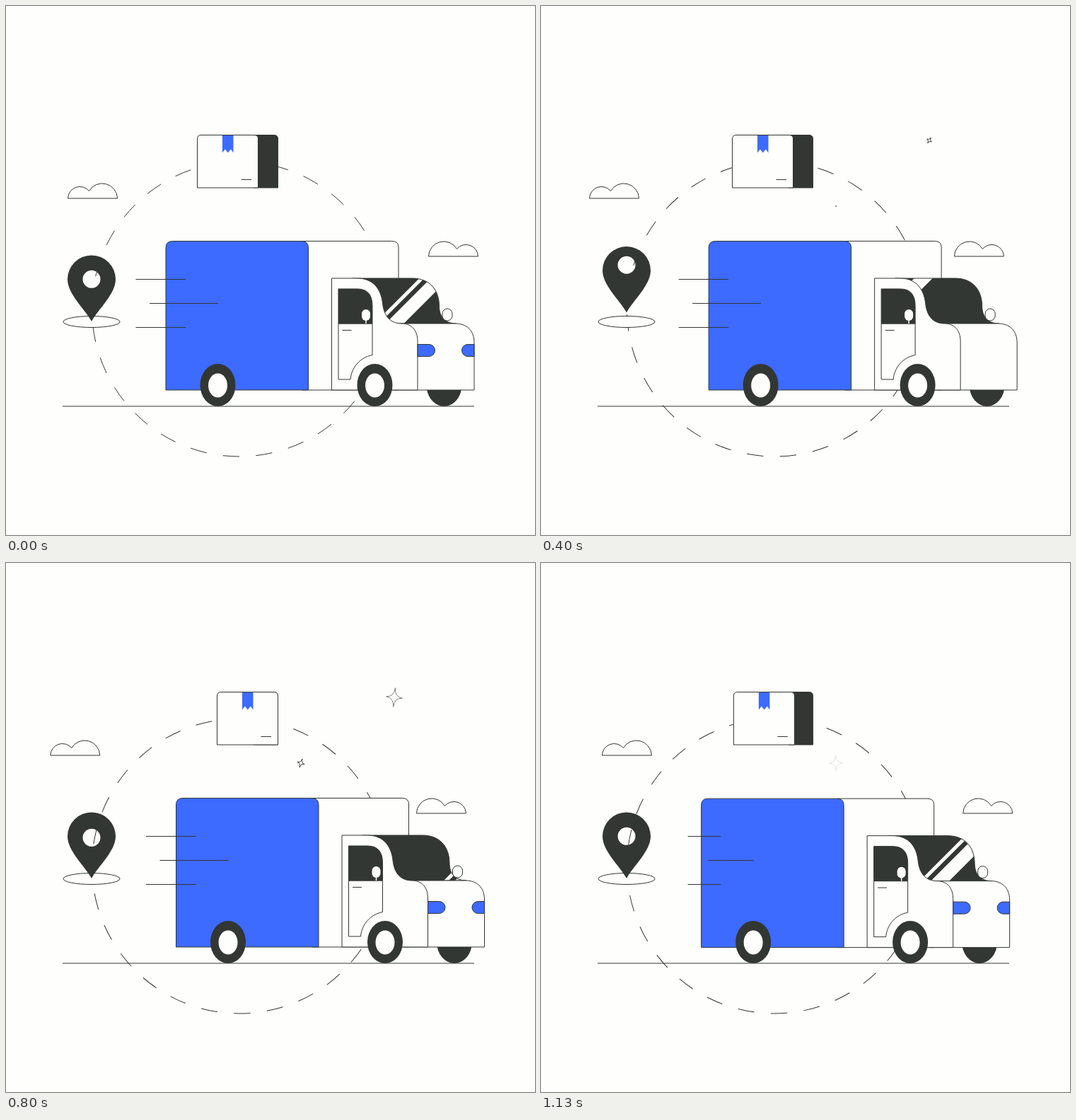
An HTML page for the animation above (1190 ms loop, 748x748 px).

```html
<!DOCTYPE html>
<html lang="en">
<head>
<meta charset="utf-8">
<title>Delivery truck</title>
<style>
  html, body { margin: 0; width: 100%; height: 100%; overflow: hidden; background: #fefefc; }
  svg { display: block; width: 100vw; height: 100vh; }
  .line { fill: #fefefc; stroke: #323734; stroke-width: 1; }
  .dark { fill: #323734; }
  .blue { fill: #3d6aff; }
  .white { fill: #fefefc; }
  .edge { stroke: #323734; stroke-width: 1; }
</style>
</head>
<body>
<svg viewBox="0 0 748 748">
  <defs>
    <path id="cloud" class="line" d="M87.5 272A17 17 0 0 1 117.5 261.5A21.5 21.5 0 0 1 157.5 272Z"/>
    <path id="star" class="line" vector-effect="non-scaling-stroke"
      d="M0-1Q.03-.04 .85 0Q.03 .04 0 1Q-.03 .04-.85 0Q-.03-.04 0-1Z"/>
    <g id="wheel">
      <ellipse class="dark" cy="536" rx="25" ry="30"/>
      <ellipse class="white" cy="536.5" rx="13.5" ry="17"/>
    </g>
    <path id="glass" d="M490 385H575C600 385 613 402 613 424C613 440 622 449 637 449H540Z"/>
    <clipPath id="glassClip"><use href="#glass"/></clipPath>
  </defs>

  <circle id="orbit" cx="330" cy="428.5" r="208.5" fill="none" class="edge" pathLength="56" stroke-dasharray="1 1"/>
  <path class="edge" d="M80 566H662"/>
  <g id="cloudL"><use href="#cloud"/></g>
  <g id="cloudR"><use href="#cloud" transform="translate(755 82) scale(-1 1)"/></g>

  <ellipse class="line" cx="121" cy="446.5" rx="40" ry="8"/>
  <path id="pin" class="dark" fill-rule="evenodd"/>

  <path class="dark edge" d="M350 182.5H379Q384.5 182.5 384.5 188V257H350Z"/>
  <g id="face">
    <path class="line" d="M270.5 257V188Q270.5 182.5 276 182.5H351Q356.5 182.5 356.5 188V257Z"/>
    <path class="blue" d="M306 183H321.5V207.5L317.8 202.5L313.8 207.5L309.8 202.5L306 207.5Z"/>
    <path class="edge" d="M332.5 245.5H347"/>
  </g>

  <g id="starA"><use href="#star"/></g>
  <g id="starB"><use href="#star"/></g>

  <g id="truck">
    <ellipse class="dark" cx="620" cy="536" rx="25" ry="30"/>
    <g id="body">
      <path class="line" d="M419 543V332.5H546Q555.5 332.5 555.5 341V543Z"/>
      <path class="blue edge" d="M226.5 543V342Q226.5 332.5 236 332.5H418.5Q428 332.5 428 342V543Z"/>
      <use href="#glass" class="dark"/>
      <g clip-path="url(#glassClip)">
        <path id="shine" class="white" d="M470 500L610 360H617L477 500ZM486 500L626 360H652L512 500Z"/>
      </g>
      <use href="#glass" fill="none" class="edge"/>
      <path class="line" d="M550 449H636C652 449 662.5 459 662.5 476V543H550Z"/>
      <path class="line" d="M461 543V385H497C521 385 531 402 533 420C535 440 545 449 560 449C575 449 582.5 460 582.5 474V543Z"/>
      <path class="line" d="M470.5 449V528H487.5C489 511 501 497 518.5 493.5V449Z"/>
      <path class="dark edge" d="M470.5 449V400H497Q518.5 400 518.5 424V449Z"/>
      <path class="edge" d="M476 458.5H489"/>
      <path d="M509.5 443V449" stroke="#fefefc" stroke-width="1.5"/>
      <rect class="white" x="503.5" y="429" width="12" height="16" rx="6"/>
      <rect class="line" x="617.5" y="428" width="14" height="17" rx="7"/>
      <g id="lamps" class="blue edge">
        <path d="M582.5 478.5H598.5A8.5 8.5 0 0 1 598.5 495.5H582.5Z"/>
        <path d="M662.5 478.5H653.5A8.5 8.5 0 0 0 653.5 495.5H662.5Z"/>
      </g>
    </g>
    <use href="#wheel" x="300"/>
    <use href="#wheel" x="522"/>
    <path id="wind" class="edge"/>
  </g>
</svg>
<script>
const LOOP = 1190, STEPS = 18, STEP_MS = 200 / 3;
const el = id => document.getElementById(id);
const set = (id, name, value) => el(id).setAttribute(name, value);
const move = (id, x, y = 0) => set(id, 'transform', `translate(${x} ${y})`);
const clamp = v => Math.min(1, Math.max(0, v));
const ease = v => (1 - Math.cos(Math.PI * clamp(v))) / 2;
const bump = (i, from, to) => Math.sin(Math.PI * clamp((i - from) / (to - from))) ** 2;

function drawPin(i) {
  const y = -14.6 * bump(i, 1, 9);
  const hole = 386.3 - 21.7 * bump(i, 1, 9.5) + 2 * bump(i, 9.5, 14.5);
  set('pin', 'd', `M121 ${446 + y}c-10-18-34-39-34-59.5a34 34 0 0 1 68 0c0 20.5-24 41.5-34 59.5Z
    M108.5 ${hole}a12.5 12.5 0 0 0 25 0a12.5 12.5 0 0 0-25 0Z`);
}

function drawStar(id, x, y, i, born, rate, gone) {
  const size = Math.max(0, i - born) * rate;
  const alpha = clamp((gone - i) / 4);
  set(id, 'transform', `translate(${x} ${y}) rotate(${(gone - 1 - i) * 4}) scale(${size})`);
  set(id, 'opacity', size > 0 ? alpha : 0);
}

// Lines shrink towards the left, then grow back out of their right ends.
function drawWind(i) {
  const u = i % 6 / 3;
  const a = u < 1 ? 0 : 2 - u, b = u < 1 ? 1 - u : 1;
  const line = (x, y, w) => `M${x + w * a} ${y}H${x + w * b}`;
  set('wind', 'd', line(184, 386.5, 70.5) + line(203.5, 420.5, 97) + line(184, 454.5, 70.5));
}

function draw(i) {
  const sway = i < 10 ? ease(i / 10) : ease((18 - i) / 8);
  const shine = 14 * (i < 9 ? -i : STEPS - i);
  set('orbit', 'transform', `rotate(${90 * i / STEPS} 330 428.5)`);
  move('cloudL', -29 * sway);
  move('cloudR', -20 * sway);
  move('truck', 17 * sway - 0.5);
  move('body', 0, 1.25 * (1 - Math.cos(Math.PI * i / 3)));
  move('shine', shine);
  move('face', 28 * (i < 12 ? ease((i - 6) / 6) : ease((18 - i) / 6)));
  set('lamps', 'visibility', i >= 5 && i < 8 ? 'hidden' : 'visible');
  drawPin(i);
  drawStar('starA', 549, 190, i, 3, 1.5, 14.5);
  drawStar('starB', 417, 283, i, 5.5, 0.98, 17.5);
  drawWind(i);
}

// Poses are held at 15 per second.
function tick() {
  const t = performance.now() % LOOP;
  draw(Math.min(STEPS - 1, Math.floor((t + 4) / STEP_MS)));
  requestAnimationFrame(tick);
}
tick();
</script>
</body>
</html>
```
